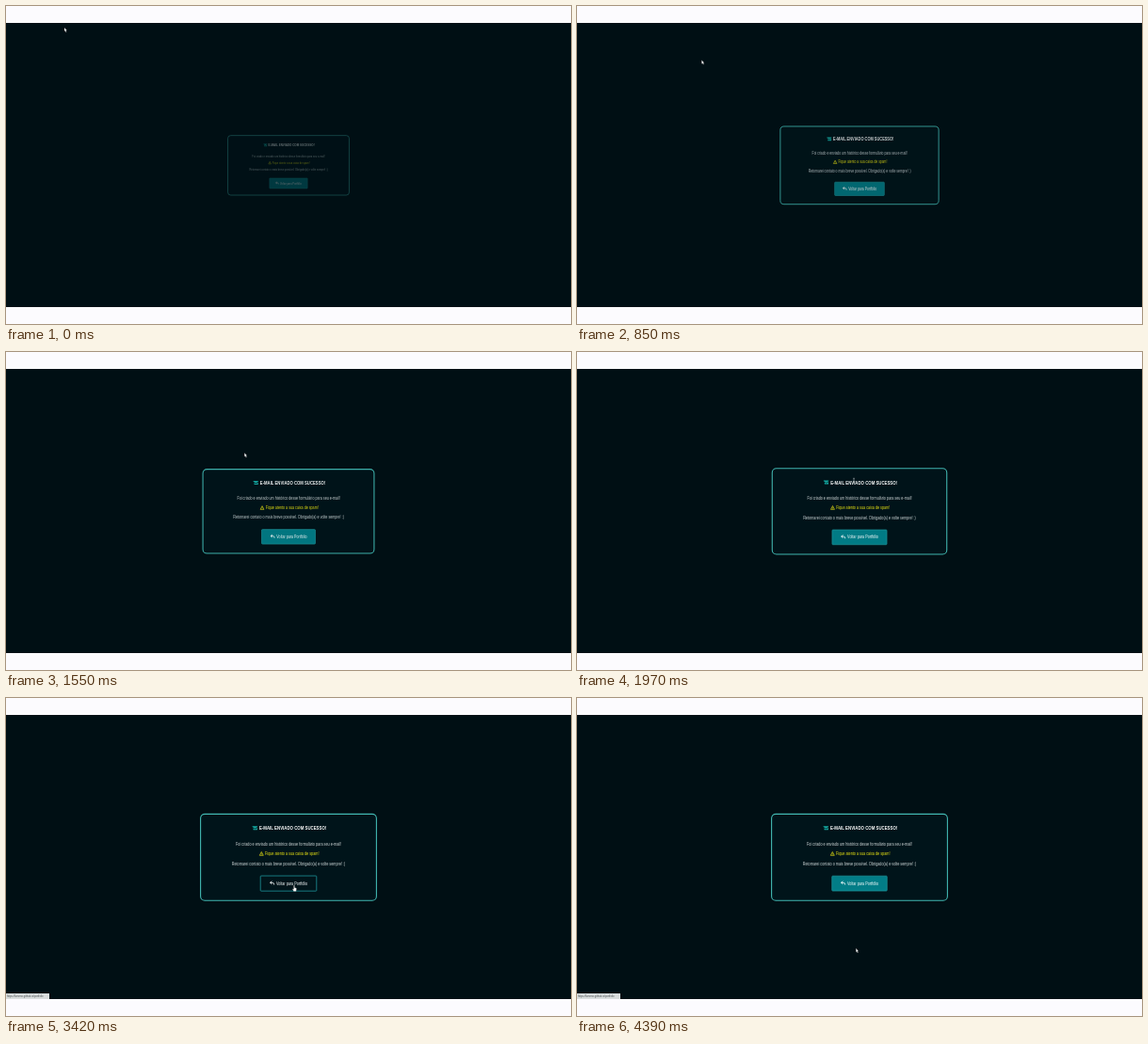
Animation of 600x338 px, one loop 4.42 s. Source, as an HTML page:

```html
<!DOCTYPE html>
<html lang="pt">
<head>
<meta charset="utf-8">
<title>E-mail enviado</title>
<style>
  html, body { margin: 0; width: 100%; height: 100%; overflow: hidden; background: #fcfbfe; }
  svg { display: block; width: 100vw; height: 100vh; }
  text { font-family: "Liberation Sans", Arial, sans-serif; white-space: pre; }
</style>
</head>
<body>
<svg viewBox="0 0 600 338" preserveAspectRatio="none">
  <rect width="600" height="338" fill="#fcfbfe"/>
  <rect y="18" width="600" height="302" fill="#000f14"/>

  <g id="card">
    <rect x="206.6" y="123.4" width="186.8" height="91.9" rx="4.5" fill="#00141a" stroke="#42b8b2" stroke-width="1.1"/>
    <g id="button">
      <rect id="fill" x="270.8" y="189.2" width="58.4" height="15.8" rx=".7" fill="#027d87"/>
      <rect x="270.8" y="189.2" width="58.4" height="15.8" rx=".7" fill="none" stroke="#1d9298" stroke-width=".8"/>
    </g>
    <g id="labels"></g>
    <path d="M261.6 136.2h5.4v.8l-2.5 1.7-2.9-1.7zM262.6 138.3l1.9 1.1 2.3-1.4v2.3h-4.2z" fill="#14aaa3"/>
    <path d="M271.3 163.5l2 3.8h-4z" fill="none" stroke="#efe713" stroke-width=".65" stroke-linejoin="round"/>
    <path d="M271.3 164.8v1.9" stroke="#efe713" stroke-width=".45"/>
    <path d="M282.4 194.8l-1.9 1.5 1.9 1.5M280.6 196.3h2.6q1.5 0 1.4 2.2" fill="none" stroke="#fff" stroke-width=".8"/>
  </g>

  <g id="status">
    <rect y="314" width="46" height="6" fill="#d9dddd"/>
  </g>

  <g id="cursor">
    <path id="arrow" d="M0 0v4.1l.9-.8.7 1.6.7-.3-.7-1.5h1.1z" fill="#fff" stroke="#222" stroke-width=".15"/>
    <path id="beam" d="M-.7-2.3h1.4M0-2.3v4.6M-.7 2.3h1.4" fill="none" stroke="#dfe6e6" stroke-width=".5"/>
    <path id="hand" d="M-.5.3q.5-.6 1 0v2.3l1.6.5q.5.2.4.8l-.4 2.6h-2.6l-1.3-2.4q.2-.7 1.3.2z" fill="#fff" stroke="#222" stroke-width=".2"/>
  </g>
</svg>

<script>
const LOOP = 4420;
const ASPECT = 0.72;
const $ = id => document.getElementById(id);

function label(parent, x, y, size, color, str, weight = 400) {
  const el = document.createElementNS('http://www.w3.org/2000/svg', 'text');
  el.setAttribute('transform', `translate(${x} ${y}) scale(${ASPECT} 1)`);
  el.setAttribute('font-size', size);
  el.setAttribute('font-weight', weight);
  el.setAttribute('fill', color);
  el.textContent = str;
  parent.append(el);
}

const BODY = 5.24;
label($('labels'), 269, 140.3, 6.06, '#fff', 'E-MAIL ENVIADO COM SUCESSO!', 700);
label($('labels'), 244, 156.8, BODY, '#d3d9da', 'Foi criado e enviado um histórico desse formulário para seu e-mail!');
label($('labels'), 275, 167.2, BODY, '#efe713', 'Fique atento a sua caixa de spam!');
label($('labels'), 239.7, 177.7, BODY, '#d3d9da', 'Retornarei contato o mais breve possível. Obrigado(a) e volte sempre! :)');
label($('labels'), 287, 198.7, BODY, '#fff', 'Voltar para Portfólio');
label($('status'), 1, 318.2, 3.8, '#4a5052', 'https://lumeno.github.io/portfolio');

// time, x, y
const path = [
  [0, 62, 23], [300, 66, 25], [550, 80, 34], [1090, 174, 76],
  [1210, 204.5, 89], [1640, 266, 112], [1970, 294, 136.5], [2700, 306, 187],
  [3000, 306, 199], [3730, 306, 199], [4390, 296.3, 266], [LOOP, 296, 268]
];

const clamp = v => Math.min(1, Math.max(0, v));
const ramp = (t, from, to) => clamp((t - from) / (to - from));

// cubic-bezier(.25, .1, .25, 1)
function ease(x) {
  let lo = 0, hi = 1;
  for (let i = 0; i < 24; i++) {
    const p = (lo + hi) / 2;
    if (0.75 * p * (1 - p) + p ** 3 < x) lo = p; else hi = p;
  }
  const q = 1 - lo;
  return 0.3 * lo * q * q + 3 * lo * lo * q + lo ** 3;
}

function pointer(t) {
  const i = Math.max(1, path.findIndex(k => k[0] >= t));
  const [t0, x0, y0] = path[i - 1], [t1, x1, y1] = path[i];
  const k = ramp(t, t0, t1);
  return [x0 + (x1 - x0) * k, y0 + (y1 - y0) * k];
}

function zoom(el, s, cx, cy) {
  el.setAttribute('transform', `translate(${cx} ${cy}) scale(${s}) translate(${-cx} ${-cy})`);
}

function draw(t) {
  const e = ease(clamp((t + 770) / 3250));
  zoom($('card'), 0.5 + 0.5 * e, 300, 169.3);
  $('card').setAttribute('opacity', e);

  const hover = ease(ramp(t, 2740, 3240)) - ease(ramp(t, 3790, 4290));
  $('fill').setAttribute('opacity', 1 - hover);
  zoom($('button'), 1 + 0.02 * hover, 300, 197.1);

  const [x, y] = pointer(t);
  const onButton = y >= 189 && y <= 205;
  const onText = (y > 133 && y < 143) || (y > 151 && y < 180);
  const shape = onButton ? 'hand' : onText ? 'beam' : 'arrow';
  for (const id of ['arrow', 'beam', 'hand'])
    $(id).setAttribute('visibility', id === shape ? 'visible' : 'hidden');
  $('cursor').setAttribute('transform', `translate(${x} ${y})`);

  $('status').setAttribute('visibility', t >= 2800 ? 'visible' : 'hidden');
}

const start = performance.now();
function frame() {
  draw((performance.now() - start) % LOOP);
  requestAnimationFrame(frame);
}
draw(0);
requestAnimationFrame(frame);
</script>
</body>
</html>
```
